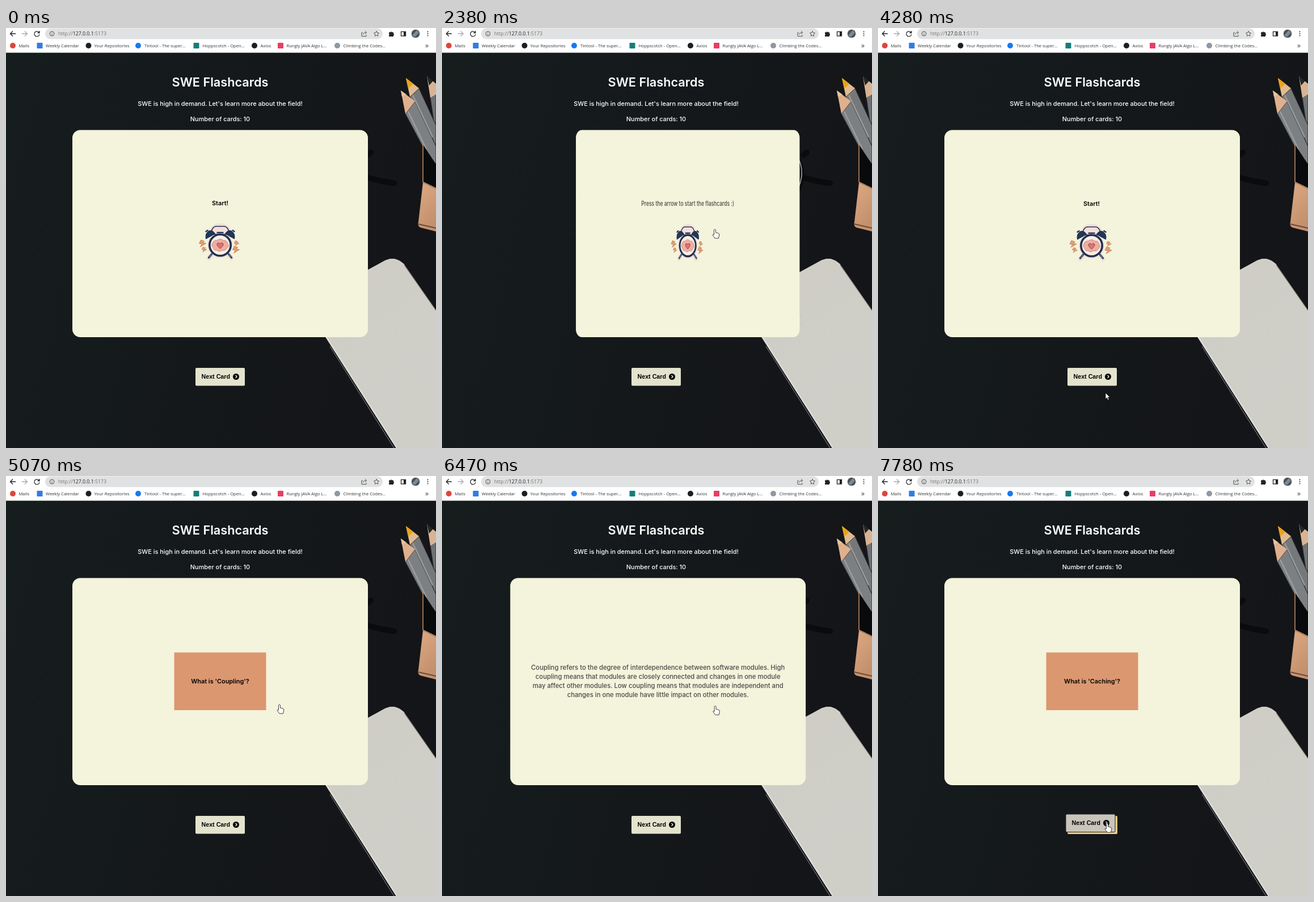
These frames come from a looping animation (758x739 px, 8 s). An HTML page:

```html
<!DOCTYPE html>
<html lang="en">
<head>
<meta charset="utf-8">
<title>SWE Flashcards</title>
<style>
  html, body { margin: 0; height: 100%; overflow: hidden; background: #15181a; }
  svg { display: block; width: 758px; height: 739px; }
  text { font-family: Inter, sans-serif; font-size: 10.9px; }
  .mid { text-anchor: middle; }
  .bold { font-weight: 600; }
  .intro { font-weight: 500; }
  .chrome text { font-family: "Open Sans", sans-serif; font-size: 7.6px; fill: #333; }
  .chrome .url { font-size: 8.75px; fill: #777; }
  .line { fill: none; stroke: #222; stroke-width: 1.3; }
  .back text { font-size: 11.3px; font-weight: 500; fill: #4a4a48; }
</style>
</head>
<body>
<svg viewBox="0 0 758 739">
  <defs>
    <linearGradient id="desk" x2="1" y2=".25">
      <stop offset="0" stop-color="#161d1d"/>
      <stop offset=".35" stop-color="#151a1c"/>
      <stop offset="1" stop-color="#141518"/>
    </linearGradient>
    <linearGradient id="shell" x2=".5" y2="1">
      <stop offset="0" stop-color="#cfcdc5"/>
      <stop offset="1" stop-color="#cfcfc8"/>
    </linearGradient>
    <linearGradient id="copper" x2=".4" y2="1">
      <stop offset="0" stop-color="#dcaa83"/>
      <stop offset="1" stop-color="#c3906c"/>
    </linearGradient>
    <path id="bolt" d="M-3-5 3-3 1 0 6 1-4 7-1 2-6 1Z" fill="#e5a06a" stroke="#b9674a" stroke-width=".7"/>
    <g id="clock">
      <g stroke="#efe1d6" stroke-width="8" stroke-linecap="round" fill="#efe1d6">
        <path d="M-16 18-20 23M16 18 20 23M-16-18Q-15-34 0-34T16-18"/>
        <circle r="18.5"/>
      </g>
      <path d="M-17-19Q-14-33-7-33H7Q14-33 17-19Z" fill="#f5dedb" stroke="#243455" stroke-width="1.6"/>
      <path d="M-15 16-20 22M15 16 20 22" stroke="#243455" stroke-width="3.4" stroke-linecap="round"/>
      <path d="M-15 16-19.5 21.5M15 16 19.5 21.5" stroke="#aeb6c6"/>
      <path id="bell" d="M-25-11Q-27-20-20-25-13-27-9-20Z" fill="#20375a" stroke="#18233f"/>
      <use href="#bell" transform="scale(-1 1)"/>
      <path d="M-25-24-22-26M25-24 22-26M-5-22H5" stroke="#243455" stroke-width="2.4" stroke-linecap="round"/>
      <circle r="18.7" fill="#f7eee7" stroke="#20304f" stroke-width="3.6"/>
      <path d="M-12 5Q-17 0-13-4-11-9-6-8 0-13 6-8 12-9 13-3 17 2 12 5 9 11 3 9-2 13-6 9-11 10-12 5Z"
        fill="#efaea2" stroke="#d78278"/>
      <path d="M0 6Q-6 1-5.5-2-3-6 0-2 3-6 5.5-2 6 1 0 6Z" fill="#dc7772" stroke="#803d48"/>
      <g class="bolts-left"><use href="#bolt" x="-31" y="-4"/><use href="#bolt" transform="translate(-28 7) scale(.75)"/></g>
      <g class="bolts-right"><use href="#bolt" transform="translate(29 -4) scale(.75)"/><use href="#bolt" x="28" y="7"/></g>
    </g>
  </defs>

  <!-- Desk -->
  <rect width="758" height="739" fill="url(#desk)"/>
  <g fill="none" stroke-linecap="round">
    <path d="M637 224 643 219M632 262 664 270 684 273M387 407 394 400" stroke="#0a0b0c" stroke-width="10"/>
    <g fill="#121a1c" stroke="#0a0b0c" stroke-width="6">
      <ellipse cx="447" cy="325" rx="57" ry="54.5"/>
      <circle cx="582" cy="258" r="53.5"/>
    </g>
    <path d="M412 339 520 282 606 238M498 277Q510 262 528 267" stroke="#0c0e0f" stroke-width="7"/>
    <path d="M401 345 414 339M602 240 621 231" stroke="#d8b8a5" stroke-width="6" stroke-linecap="butt"/>
    <g stroke="#a8a19b" stroke-width="1.6">
      <path d="M425 274Q447 267 472 276 503 292 503 326 500 373 450 380 430 380 414 369"/>
      <path d="M556 209Q582 198 606 209 637 226 634 261 627 307 584 312 562 311 548 302"/>
    </g>
    <path d="M388 336Q389 300 415 280M529 250Q532 225 550 212" stroke="#33383a"/>
  </g>
  <path d="M537 494Q538 483 549 474.500L669 409Q686 401 702 416L758 497V739H690L565 546 539 504Z" fill="url(#shell)"/>
  <path d="M537 494Q538 483 549 474.500L669 409Q686 401 702 416" fill="none" stroke="#dad7d0"/>
  <path d="M538.5 503 566 546 689 739" fill="none" stroke="#dededb" stroke-width="2.5"/>
  <path d="M571 560 684 739" fill="none" stroke="#8f918f"/>
  <path d="M540 506 551 524M702 417 758 497" fill="none" stroke="#7c7771" stroke-width="1.2"/>
  <path d="M546 486 588 461Q602 457 611 469L632 506Q638 520 626 529L597 541Q581 545 573 532L545 500Q541 492 546 486Z" fill="#d5d2cb" stroke="#c6c3bb"/>
  <g fill="#17191b" stroke="#aeada7" stroke-width="1.5">
    <circle cx="566" cy="492" r="13"/><circle cx="604" cy="492" r="13"/><circle cx="585.5" cy="522" r="13"/>
  </g>
  <g fill="#253031"><circle cx="566" cy="492" r="5"/><circle cx="604" cy="492" r="5"/><circle cx="585.5" cy="522" r="5"/></g>
  <circle cx="592" cy="471.5" r="7.5" fill="#dfbbab" stroke="#b9aaa2"/>
  <circle cx="617" cy="513" r="2.5" fill="#3b3a38"/>

  <g stroke="#2b2d2e" stroke-width="1.2">
    <path d="M748 123 758 116V190Z" fill="#6f7375"/>
    <path d="M712 121 728 106 758 171V222Z" fill="#76797b"/>
    <path d="M704 151 721 129 758 208V240L736 211Z" fill="#7d8082"/>
  </g>
  <path d="M709 147 741 213M717 118 752 192" stroke="#9b9d9e" stroke-width="2.5"/>
  <path d="M742 85 758 98V117L748 123Z" fill="#d8b494"/><path d="M742 85 753 93 746 101Z" fill="#242525"/>
  <path d="M705 88 728 106 712 121Z" fill="#e0bb91"/><path d="M705 88 718 98 709 107Z" fill="#e9a31b"/>
  <path d="M696 110 721 129 704 151Z" fill="#dfb08d"/><path d="M696 110 706 117 698 121Z" fill="#e8c19d"/>
  <path d="M735 205 758 240V283L735 271Z" fill="#090a0b"/>
  <path d="M735 204V271L758 282" fill="none" stroke="#c58f68" stroke-width="1.5"/>
  <path d="M735 272 758 283V358L730 351Q725 348 727 341Z" fill="url(#copper)"/>
  <path d="M727 345 758 352" stroke="#6d4a38" stroke-width="2"/>

  <!-- Browser bar -->
  <g class="chrome">
    <rect width="758" height="43.5" fill="#fff"/>
    <rect x="69" y=".5" width="595" height="19" rx="9.5" fill="#e0e1e2"/>
    <path class="line" d="M17 10H8M12 5.5 7.5 10 12 14.5"/>
    <path class="line" d="M28 10H37M33 5.5 37.5 10 33 14.5" style="stroke:#aaa"/>
    <path class="line" d="M58 7.5A4.5 4.5 0 1 0 59 11M59 5V8.5H55.5"/>
    <g class="line" style="stroke:#555;stroke-width:1">
      <circle cx="81" cy="10" r="4"/><path d="M81 9.5V12.5M81 7.5V8.5"/>
      <path d="M629 8H627V14.5H635V12M629.5 11.5Q630 8 635 8M633 5.5 635.8 8 633 10.5"/>
      <path d="M653 5.5 654.4 8.4 657.5 8.8 655.2 11 655.8 14.2 653 12.7 650.2 14.2 650.8 11 648.5 8.8 651.6 8.4Z"/>
    </g>
    <text class="url" x="92" y="13.2">http://<tspan fill="#222">127.0.0.1</tspan>:5173</text>
    <path d="M675 7.5H677.5A1.6 1.6 0 0 1 680.5 7.5H683V10A1.6 1.6 0 0 1 683 13V15H675V12.5A1.5 1.5 0 0 0 675 10Z" fill="#222"/>
    <rect class="line" x="696.5" y="6.5" width="8" height="7.5"/><rect x="701" y="6" width="4" height="8" fill="#222"/>
    <circle cx="722" cy="10" r="7.3" fill="#4a535c"/><path d="M716 13 724 4 728 8 721 16Z" fill="#7e8993"/>
    <g fill="#333"><circle cx="743.5" cy="6.5" r="1"/><circle cx="743.5" cy="10" r="1"/><circle cx="743.5" cy="13.5" r="1"/></g>
    <g id="bookmarks"></g>
    <text x="739" y="34.5" style="font-size:12px">»</text>
  </g>

  <!-- Page -->
  <g class="mid intro" fill="#fff">
    <text class="bold" x="377.5" y="103" style="font-size:21.7px">SWE Flashcards</text>
    <text x="377.5" y="137">SWE is high in demand. Let's learn more about the field!</text>
    <text x="377.5" y="164">Number of cards: 10</text>
  </g>
  <g id="card" class="mid">
    <rect x="-260.5" y="179.5" width="521" height="364.5" rx="14" fill="#f4f3dc"/>
    <g id="start"><text class="bold" y="312">Start!</text><use href="#clock" y="382"/></g>
    <g id="question">
      <rect x="-81" y="310.5" width="162" height="101.5" fill="#db9770"/>
      <text id="prompt" class="bold" y="365"></text>
    </g>
    <g id="hint" class="back"><text y="313">Press the arrow to start the flashcards :)</text><use href="#clock" y="383"/></g>
    <g id="answer" class="back">
      <text y="341">Coupling refers to the degree of interdependence between software modules. High</text>
      <text y="357">coupling means that modules are closely connected and changes in one module</text>
      <text y="373">may affect other modules. Low coupling means that modules are independent and</text>
      <text y="389">changes in one module have little impact on other modules.</text>
    </g>
  </g>
  <rect id="shadow" x="334" y="598" width="88" height="32" rx="2" fill="#efcb86"/>
  <g id="button">
    <rect id="face" x="334" y="598" width="87" height="31.5" rx="2"/>
    <text x="344.5" y="617" style="font:bold 10.7px 'Liberation Sans',sans-serif">Next Card</text>
    <circle cx="405.5" cy="613.5" r="5.5"/>
    <path d="M404.5 611 407 613.5 404.5 616" fill="none" stroke="#fff" stroke-width="1.3"/>
  </g>
  <g id="cursor" fill="#fff" stroke="#111" stroke-width=".8" stroke-linejoin="round">
    <path id="arrow" d="M0 0V11L2.5 8.6 4.3 12.6 6.2 11.8 4.4 7.8H8Z"/>
    <path id="hand" d="M-1.5 1.2Q0-1.2 1.5 1.2V6L6 7Q8 7.5 7.8 10L6.5 16H0L-3.8 10.5Q-4 8-1.5 10Z"/>
  </g>
</svg>
<script>
const $ = id => document.getElementById(id);
const LOOP = 8000, FLIP = 900;

// x of icon, x of label, icon colour, round icon, label
const bookmarks = [
  [12, 22.5, '#e0443a', true, 'Mails'],
  [59.5, 70, '#2f7de1', false, 'Weekly Calendar'],
  [145.5, 155.5, '#1b1f23', true, 'Your Repositories'],
  [233, 244, '#1a78f2', true, 'Tintool - The super...'],
  [335.5, 346.5, '#14807a', false, 'Hoppscotch - Open...'],
  [438, 448.5, '#1b1f23', true, 'Axios'],
  [484, 494.5, '#e83e65', false, 'Rungly JAVA Algo L...'],
  [584, 594.5, '#8b98a5', true, 'Climbing the Codes...'],
];
$('bookmarks').innerHTML = bookmarks.map(([icon, label, color, round, name]) =>
  `<rect x="${icon - 5}" y="26" width="10" height="10" rx="${round ? 5 : 1}" fill="${color}"/>
   <text x="${label}" y="34">${name}</text>`).join('');

// time, x, y of the pointer tip
const pointer = [
  [270, 704, 703], [370, 640, 560], [470, 555, 430], [570, 512, 381],
  [1170, 512, 381], [1270, 481, 354], [3970, 481, 354], [4070, 470, 400],
  [4170, 425, 560], [4270, 401, 642], [4370, 400, 625], [4470, 404, 612],
  [4670, 404, 612], [4770, 430, 580], [4870, 465, 500], [4970, 480, 410],
  [5070, 482, 402], [6370, 482, 402], [6970, 480, 416], [7070, 472, 460],
  [7170, 430, 588], [7270, 404, 611], [LOOP, 404, 611],
];

function pointerAt(t) {
  const i = Math.max(1, pointer.findIndex(key => key[0] >= t));
  const [t0, x0, y0] = pointer[i - 1], [t1, x1, y1] = pointer[i];
  const k = (t - t0) / (t1 - t0);
  return [x0 + (x1 - x0) * k, y0 + (y1 - y0) * k];
}

// CSS "ease": cubic-bezier(.25, .1, .25, 1)
function ease(x) {
  if (x <= 0 || x >= 1) return x <= 0 ? 0 : 1;
  const bezier = (a, b, s) => 3 * (1 - s) ** 2 * s * a + 3 * (1 - s) * s * s * b + s ** 3;
  let low = 0, high = 1;
  for (let i = 0; i < 20; i++) {
    const s = (low + high) / 2;
    if (bezier(.25, .25, s) < x) low = s; else high = s;
  }
  return bezier(.1, 1, low);
}

// Start times of the flips, alternately forward and back
const flipAt = t => [1945, 3307.5, 5676, 6782]
  .reduce((sum, start, i) => sum + (i % 2 ? -1 : 1) * ease((t - start) / FLIP), 0);

const show = (id, visible) => $(id).style.display = visible ? '' : 'none';
const inside = (x, y, left, top, right, bottom) => x >= left && x <= right && y >= top && y <= bottom;
const move = (selector, x, y) => document.querySelector(selector).setAttribute('transform', `translate(${x} ${y})`);

function draw(time) {
  // The screen refreshes every 100 ms.
  const t = Math.max(0, Math.floor((time + 30) / 100) * 100 - 30);

  const turn = flipAt(t) * Math.PI, cos = Math.cos(turn);
  const drift = -(46 + 18 * cos * cos) * Math.sin(2 * turn);
  $('card').setAttribute('transform', `translate(${377.5 + drift} 0) scale(${Math.abs(cos)} 1)`);
  const isFront = cos > 0, isIntro = t < 4570;
  show('start', isFront && isIntro);
  show('question', isFront && !isIntro);
  show('hint', !isFront && isIntro);
  show('answer', !isFront && !isIntro);
  $('prompt').textContent = t < 7570 ? "What is 'Coupling'?" : "What is 'Caching'?";
  const nudge = t > 1945 ? 1 : 0;
  move('#start', -nudge, nudge);

  const beat = Math.max(0, Math.floor((t - 70) / 300));
  const spread = beat % 3 ? 1.5 : 0;
  move('.bolts-left', -spread, 0);
  move('.bolts-right', spread, 0);

  const [x, y] = pointerAt(t);
  const onButton = inside(x, y, 334, 598, 421, 630);
  const onCard = inside(x, y, 117, 179, 638, 544);
  show('cursor', t >= 270);
  move('#cursor', x, y);
  show('hand', onButton || onCard);
  show('arrow', !onButton && !onCard);

  const lift = onButton ? -3 : 0;
  show('shadow', onButton);
  move('#button', lift, lift);
  $('face').setAttribute('fill', onButton ? '#c9c5bb' : '#e4e3cd');
  $('face').setAttribute('stroke', onButton ? '#222' : 'none');
}

const begin = performance.now();
function tick() {
  draw((performance.now() - begin) % LOOP);
  requestAnimationFrame(tick);
}
tick();
</script>
</body>
</html>
```
